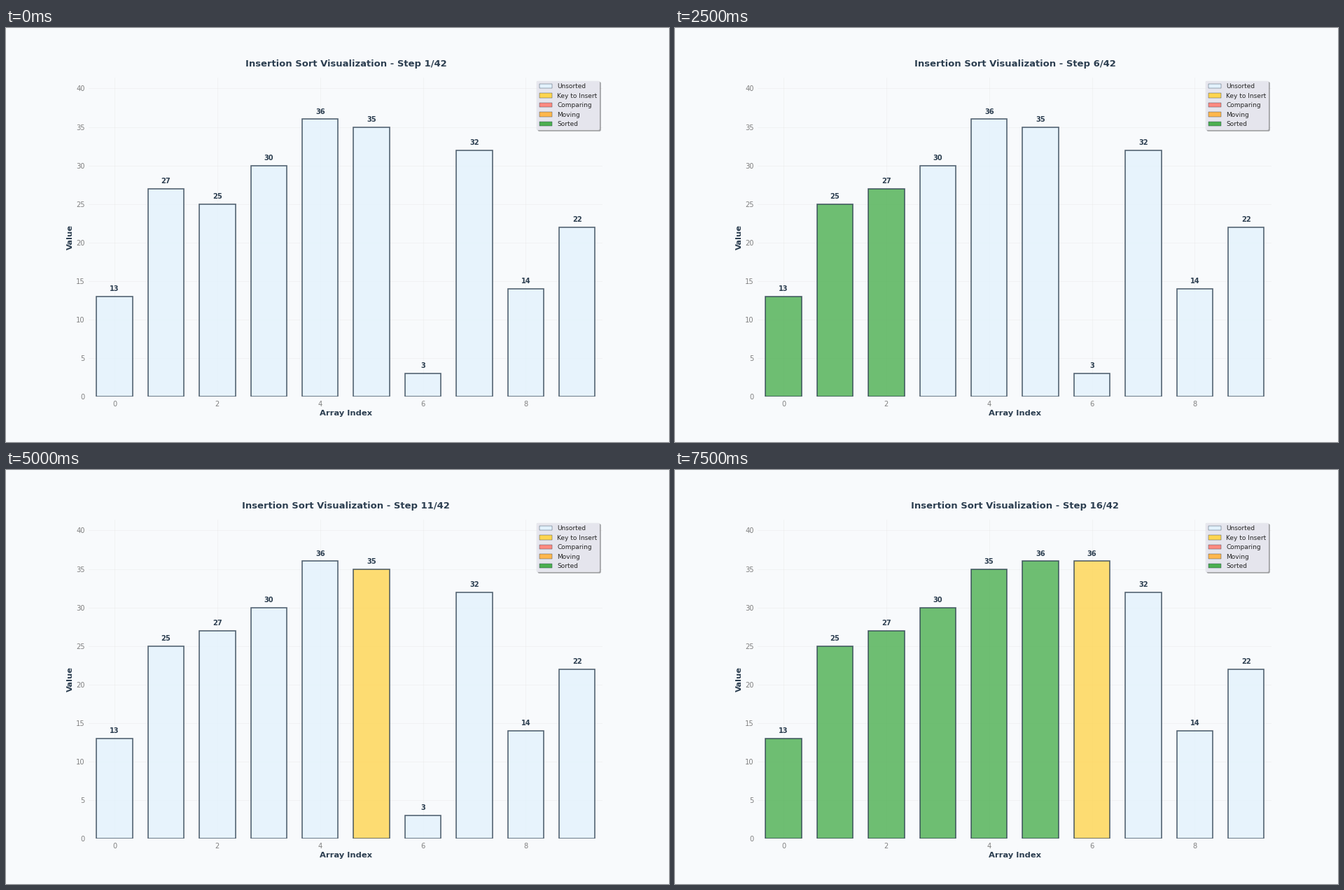
A matplotlib script that plays this animation: 947 px wide and 592 px high, repeating every 8 s.

```python
import matplotlib.pyplot as plt
from matplotlib.animation import FuncAnimation
from matplotlib.patches import Patch

VALUES = [13, 27, 25, 30, 36, 35, 3, 32, 14, 22]
SHOWN_STEPS = 16
STEP_MS = 500

BACKGROUND = "#f8fafc"
INK = "#2c3e50"
UNSORTED, KEY, COMPARING, MOVING, SORTED = (
    "#e3f2fd", "#ffd54f", "#ff8a80", "#ffb74d", "#4caf50")
LEGEND = {
    "Unsorted": UNSORTED,
    "Key to Insert": KEY,
    "Comparing": COMPARING,
    "Moving": MOVING,
    "Sorted": SORTED,
}

plt.rcParams.update({
    "font.family": "DejaVu Sans",
    "text.color": "0.15",
    "axes.facecolor": "#eaeaf2",
    "axes.axisbelow": True,
    "patch.linewidth": 0.3,
})


def insertion_sort_steps(values):
    """Yield (values, colours) for each step of the sort."""
    data = list(values)
    n = len(data)

    def shade(done, **marks):
        colors = [SORTED] * done + [UNSORTED] * (n - done)
        if "key" in marks:
            colors[marks["key"]] = KEY
        # the sorted part keeps its colour while values shift inside it
        if marks.get("slot", -1) >= done:
            colors[marks["slot"]] = MOVING
        return colors

    yield data[:], shade(0)
    for i in range(1, n):
        key, j = data[i], i - 1
        yield data[:], shade(0, key=i)
        while j >= 0 and data[j] > key:
            yield data[:], shade(i, key=i, slot=j + 1)
            data[j + 1] = data[j]
            j -= 1
        data[j + 1] = key
        yield data[:], shade(i + 1)
    yield data[:], shade(n)


steps = list(insertion_sort_steps(VALUES))

fig, ax = plt.subplots(figsize=(16, 10), dpi=59.2, facecolor=BACKGROUND)
ax.set_facecolor(BACKGROUND)
ax.set_xlim(-0.5, len(VALUES) - 0.5)
ax.set_ylim(0, max(VALUES) * 1.15)
ax.spines[:].set_visible(False)
ax.grid(True, color="#e0e0e0", linewidth=1, alpha=0.35)
ax.tick_params(length=0, pad=7, labelsize=12, labelcolor="#808080")
ax.set_xlabel("Array Index", fontsize=14, fontweight="bold", color=INK)
ax.set_ylabel("Value", fontsize=14, fontweight="bold", color=INK)
title = ax.set_title("", fontsize=16, fontweight="bold", color=INK, pad=20)

bars = ax.bar(range(len(VALUES)), VALUES, width=0.7, color=UNSORTED,
              edgecolor=INK, linewidth=2, alpha=0.8)
labels = [ax.text(x, 0, "", ha="center", va="bottom", fontsize=12,
                  fontweight="bold", color=INK) for x in range(len(VALUES))]

ax.legend(
    handles=[Patch(facecolor=color, edgecolor=INK, linewidth=0.5, label=name)
             for name, color in LEGEND.items()],
    loc="upper right", fontsize=11, frameon=True, shadow=True,
    framealpha=0.95)


def draw(frame):
    values, colors = steps[frame]
    for bar, label, value, color in zip(bars, labels, values, colors):
        bar.set_height(value)
        bar.set_facecolor(color)
        label.set_y(value + 0.5)
        label.set_text(str(value))
    title.set_text(
        f"Insertion Sort Visualization - Step {frame + 1}/{len(steps)}")
    return [*bars, *labels, title]


anim = FuncAnimation(fig, draw, frames=SHOWN_STEPS, interval=STEP_MS,
                     repeat=True, repeat_delay=0, blit=False)
plt.show()
```
